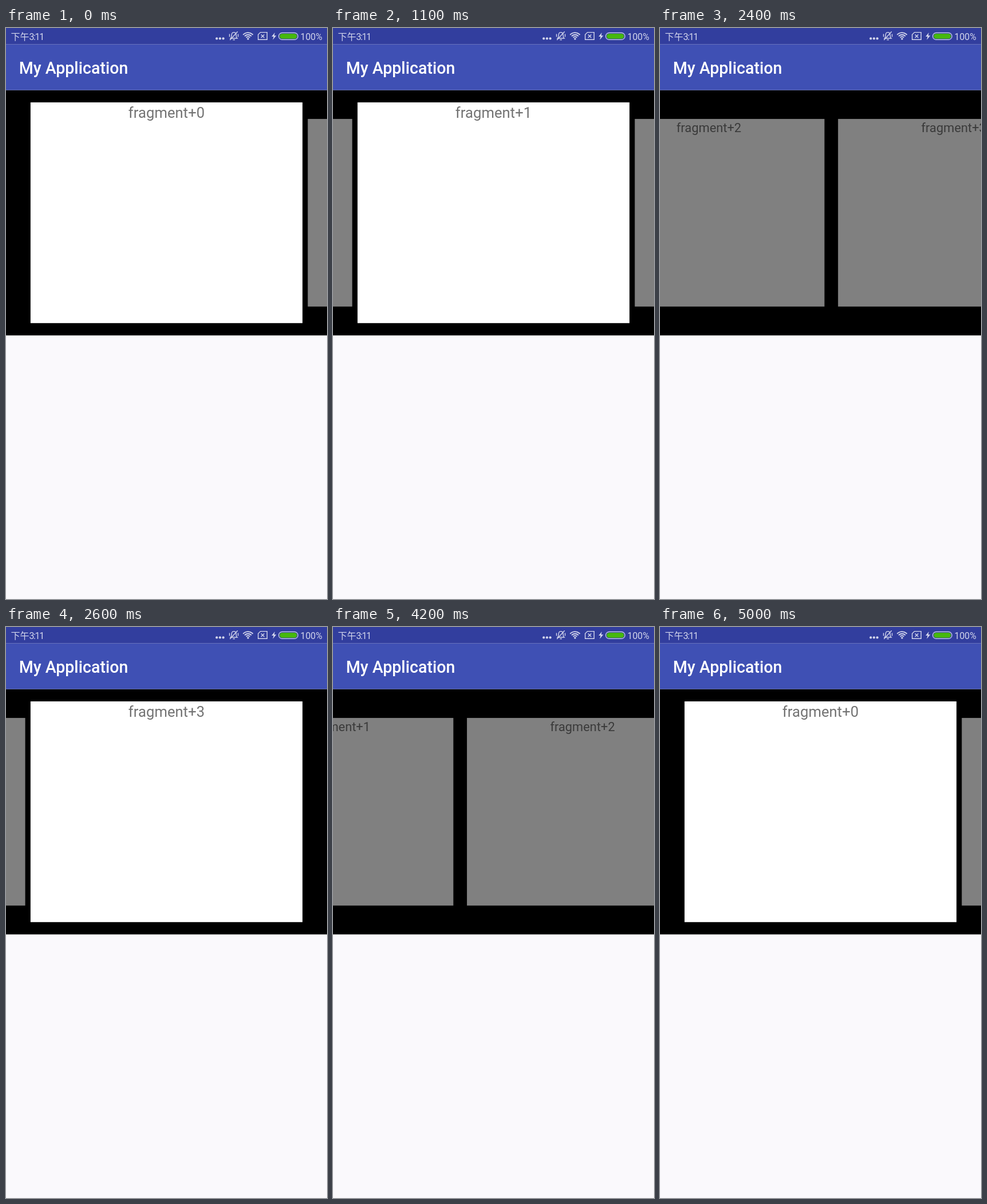
These frames come from a looping animation (561 by 998 pixels, 5100 ms). An HTML page with a canvas:

```html
<!DOCTYPE html>
<html lang="en">
<head>
<meta charset="utf-8">
<title>My Application</title>
<style>
  html, body { margin: 0; width: 100%; height: 100%; overflow: hidden; background: #faf9fc; }
  canvas { display: block; width: 561px; height: 998px; }
</style>
</head>
<body>
<canvas id="stage" width="561" height="998"></canvas>
<script>
const ctx = document.getElementById('stage').getContext('2d');
const W = 561, H = 998, LOOP = 5100, STEP = 100;
const SANS = 'Roboto, "Noto Sans CJK SC", "Noto Sans CJK", sans-serif';
const INK = '#d3d6ec';

// Pager geometry
const PAGE = { x: 42.85, y: 130, w: 475.3, h: 385.8 };
const PITCH = PAGE.w - 5.2;
const MIN_SCALE = 0.85, MIN_ALPHA = 0.5;

// Each swipe: start time, first page, last page, progress per step
const SWIPES = [
  [800, 0, 1, [0.04, 0.46, 0.96, 1]],
  [1500, 1, 2, [0.03, 0.46, 0.96, 1]],
  [2400, 2, 3, [0.46, 0.96, 1]],
  [3600, 3, 2, [0.516, 0.968, 1]],
  [4200, 2, 1, [0.376, 0.96, 1]],
  [4900, 1, 0, [0.95, 1]]
];

function scrollAt(t) {
  let pos = 0;
  for (const [start, from, to, steps] of SWIPES) {
    if (t < start) break;
    const i = Math.min(Math.floor((t - start) / STEP), steps.length - 1);
    pos = from + (to - from) * steps[i];
  }
  return pos;
}

function rect(x, y, w, h, color) {
  ctx.fillStyle = color;
  ctx.fillRect(x, y, w, h);
}

function text(str, x, y, font, color, align = 'left', spacing = 0) {
  ctx.font = font + ' ' + SANS;
  ctx.fillStyle = color;
  ctx.textAlign = align;
  ctx.letterSpacing = spacing + 'px';
  ctx.fillText(str, x, y);
}

function dot(x, y, r) {
  ctx.beginPath();
  ctx.arc(x, y, r, 0, Math.PI * 2);
  ctx.fill();
}

function line(points, close) {
  ctx.beginPath();
  points.forEach(([x, y]) => ctx.lineTo(x, y));
  if (close) ctx.closePath();
  ctx.stroke();
}

function pill(x, y, w, h) {
  ctx.beginPath();
  ctx.roundRect(x, y, w, h, h / 2);
}

function bell() {
  ctx.lineWidth = 1.4;
  ctx.beginPath();
  ctx.moveTo(392.5, 18);
  ctx.quadraticCurveTo(394.3, 16.5, 394.3, 12.5);
  ctx.bezierCurveTo(394.3, 6, 402.2, 6, 402.2, 12.5);
  ctx.quadraticCurveTo(402.2, 16.5, 404, 18);
  ctx.closePath();
  ctx.stroke();
  line([[396.5, 20.6], [400, 20.6]]);
  line([[390.6, 10.5], [390.6, 15.5]]);
  line([[405.6, 10.5], [405.6, 15.5]]);
  line([[404.8, 6.2], [391.4, 21]]);
}

function wifi() {
  ctx.lineWidth = 1.9;
  for (const r of [4.3, 7.9, 11.5]) {
    ctx.beginPath();
    ctx.arc(423, 19.6, r, -Math.PI * 0.77, -Math.PI * 0.23);
    ctx.stroke();
  }
  dot(423, 19, 1.7);
}

function simCard() {
  ctx.lineWidth = 1.4;
  line([[444.6, 7.6], [456.3, 7.6], [456.3, 20.3], [440.7, 20.3], [440.7, 11.5]], true);
  line([[445.8, 11.4], [451.4, 17]]);
  line([[451.4, 11.4], [445.8, 17]]);
}

function battery() {
  ctx.beginPath();
  [[469.8, 8], [464.2, 15], [467.7, 15], [466.2, 20.8], [472.4, 13.2], [468.8, 13.2]]
    .forEach(([x, y]) => ctx.lineTo(x, y));
  ctx.fill();
  ctx.lineWidth = 1.2;
  pill(476.6, 8.4, 33.6, 12);
  ctx.stroke();
  ctx.fillStyle = '#46b80e';
  pill(478.3, 10, 30.2, 8.8);
  ctx.fill();
}

function statusBar() {
  rect(0, 0, W, 28.6, '#323e9e');
  text('下午', 8.5, 20.5, '16px', INK);
  text('3:11', 40.5, 20.5, '16px', INK, 'left', -1.4);
  text('100%', 514.5, 20.5, '15.8px', INK);
  ctx.fillStyle = ctx.strokeStyle = INK;
  [368.3, 374, 379.7].forEach(x => dot(x, 18.4, 2.1));
  bell();
  wifi();
  simCard();
  battery();
}

function toolbar() {
  rect(0, 28.6, W, 80, '#3f50b4');
  text('My Application', 22.85, 80, '500 28.57px', '#fff');
}

// Zoom-out page effect
function page(index, scroll) {
  const offset = (index - scroll) * PITCH;
  const position = offset / PAGE.w;
  if (Math.abs(position) > 1) return;
  const scale = Math.max(MIN_SCALE, 1 - Math.abs(position));
  const alpha = MIN_ALPHA + (scale - MIN_SCALE) / (1 - MIN_SCALE) * (1 - MIN_ALPHA);
  const shift = (PAGE.w / 2 - PAGE.h / 4) * (1 - scale);
  const cx = PAGE.x + PAGE.w / 2 + offset + (position < 0 ? shift : -shift);

  ctx.save();
  ctx.translate(cx, PAGE.y + PAGE.h / 2);
  ctx.scale(scale, scale);
  const gray = v => `rgb(${[v, v, v].map(c => Math.round(c * alpha))})`;
  rect(-PAGE.w / 2, -PAGE.h / 2, PAGE.w, PAGE.h, gray(256));
  text('fragment+' + index, 0, 27.4 - PAGE.h / 2, '25.71px', gray(115), 'center');
  ctx.restore();
}

function draw(t) {
  const scroll = scrollAt(t);
  rect(0, 0, W, H, '#faf9fc');
  rect(0, 108.6, W, 428.7, '#000');
  for (let i = 0; i < 4; i++) page(i, scroll);
  statusBar();
  toolbar();
}

const start = performance.now();
function tick() {
  draw((performance.now() - start) % LOOP);
  requestAnimationFrame(tick);
}
tick();
</script>
</body>
</html>
```
